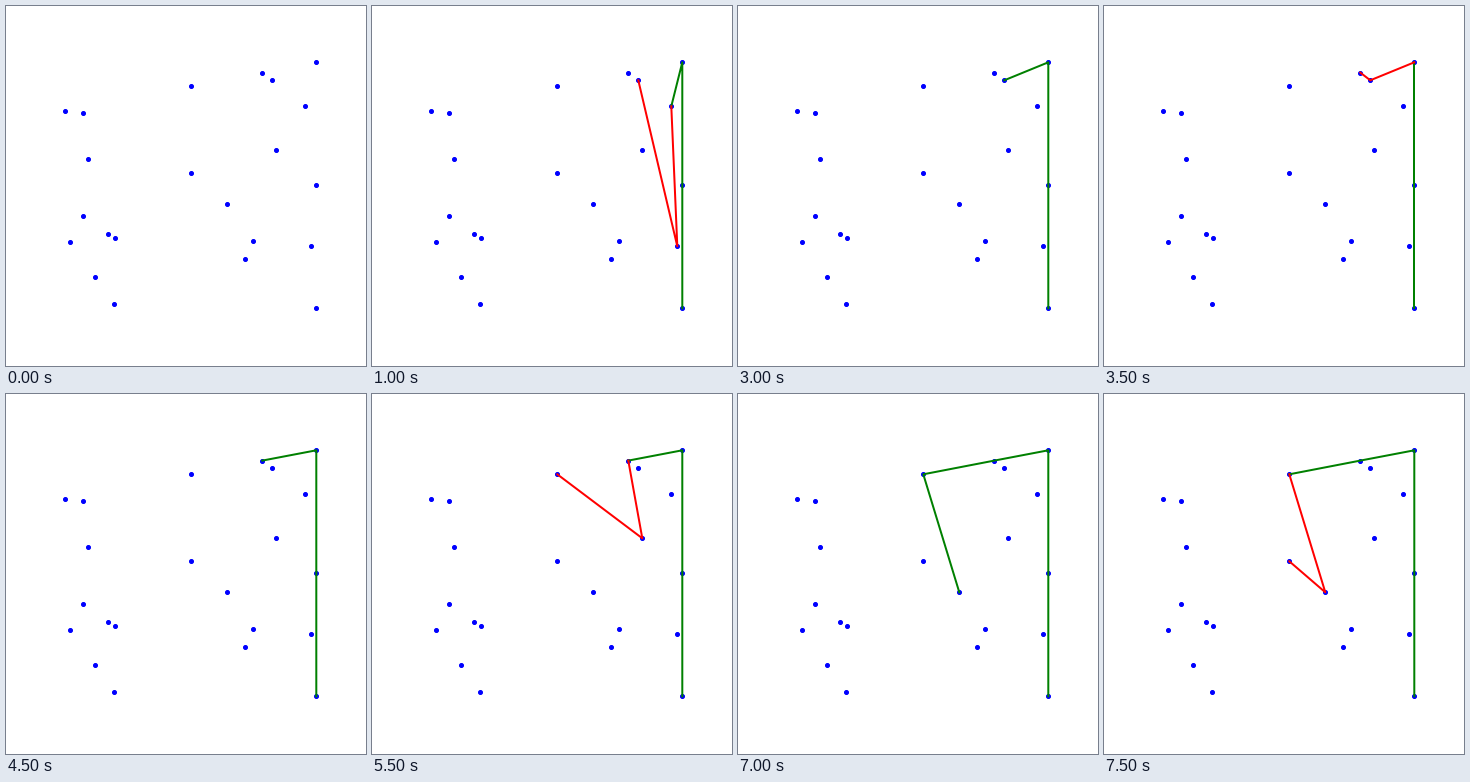
A matplotlib script for the animation above (8000 ms loop, 360 by 360 pixels).

```python
from math import atan2, dist

import matplotlib.pyplot as plt
from matplotlib.animation import FuncAnimation

SIZE, DPI, FRAMES = 360, 72, 16
SHIFT = 0.3  # keeps points inside their pixels

# The scattered points, left to right; the scan order follows from the angles.
POINTS = [
    (59, 105), (64, 236), (77, 107), (77, 210), (82, 153), (89, 271),
    (102, 228), (108, 298), (109, 232), (185, 80), (185, 167), (221, 198),
    (239, 253), (247, 235), (256, 66.3), (266, 74), (270, 144), (299, 100),
    (305, 240), (310, 56), (310, 179), (310, 302),
]
START = max(POINTS, key=lambda p: p[1])


def scan_key(p):
    """Angle from straight up around the start, then distance."""
    return atan2(START[0] - p[0], START[1] - p[1]), dist(p, START)


def turn(a, b, c):
    """Negative when a-b-c bends towards the inside (y points down)."""
    return (b[1] - a[1]) * (c[0] - a[0]) - (b[0] - a[0]) * (c[1] - a[1])


def graham_steps(points):
    """Yield (hull, rejected corner) for every push, reject and pop."""
    yield [], []
    hull = points[:4]
    for p in points[4:]:
        while turn(hull[-2], hull[-1], p) < 0:
            yield hull[:-1], [hull[-2], hull[-1], p]
            hull = hull[:-1]
            yield hull, []
        hull = hull + [p]
        yield hull, []


STEPS = list(graham_steps(sorted(POINTS, key=scan_key)))[:FRAMES]

fig = plt.figure(figsize=(SIZE / DPI, SIZE / DPI), dpi=DPI, facecolor="white")
ax = fig.add_axes([0, 0, 1, 1])
ax.set_xlim(-SHIFT, SIZE - SHIFT)
ax.set_ylim(SIZE - SHIFT, -SHIFT)
ax.axis("off")

ax.plot(*zip(*POINTS), "bo", ms=4, zorder=1)
hull_line, = ax.plot([], [], color="green", lw=2, zorder=2)
corner_line, = ax.plot([], [], color="red", lw=2, zorder=3)


def set_path(line, path):
    line.set_data([x for x, _ in path], [y for _, y in path])


def update(i):
    hull, corner = STEPS[i]
    set_path(hull_line, hull)
    set_path(corner_line, corner)
    return hull_line, corner_line


anim = FuncAnimation(fig, update, frames=FRAMES, init_func=lambda: update(0),
                     interval=500, repeat=True, repeat_delay=0)
plt.show()
```
